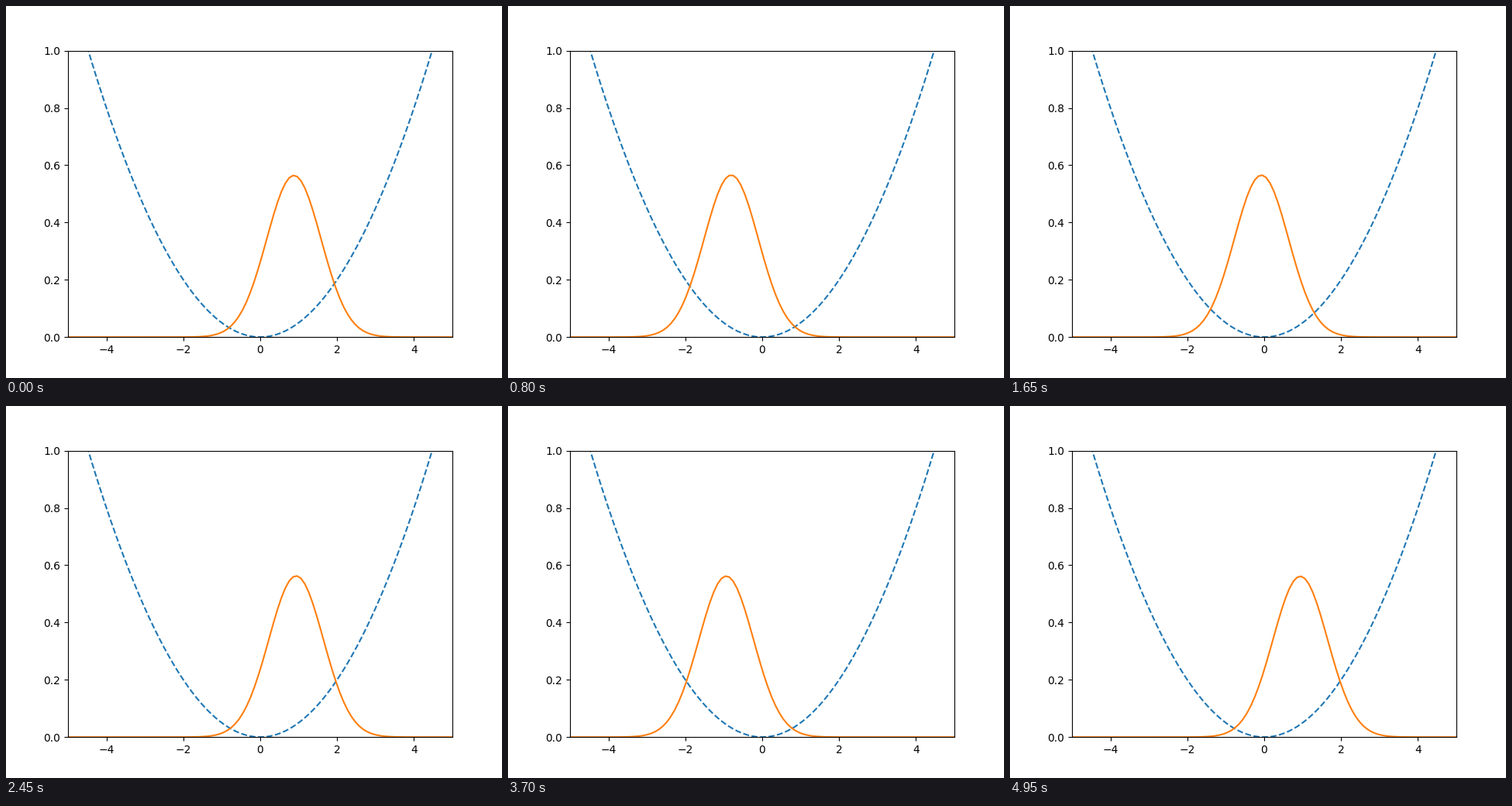
Animation, 640 px wide and 480 px high, one loop 5000 ms. Source, as a matplotlib script:

```python
import numpy as np
import matplotlib.pyplot as plt
from matplotlib.animation import FuncAnimation

FRAMES = 100
INTERVAL = 50
DT = 4 * np.pi / FRAMES
LEAD_STEPS = 4  # steps already taken when the loop begins

# Harmonic oscillator on a grid, with hbar = m = omega = 1
N = 100
x = np.linspace(-5, 5, N)
dx = x[1] - x[0]
potential = x**2 / 2
laplacian = (np.eye(N, k=1) + np.eye(N, k=-1) - 2 * np.eye(N)) / dx**2
energies, modes = np.linalg.eigh(np.diag(potential) - laplacian / 2)

# Ground state displaced by one unit, expanded in eigenmodes
packet = np.pi**-0.25 * np.exp(-((x - 1) ** 2) / 2)
coeffs = modes.T @ packet


def density(t):
    psi = modes @ (coeffs * np.exp(-1j * energies * t))
    return np.abs(psi) ** 2


fig, ax = plt.subplots(figsize=(6.4, 4.8), dpi=100)
ax.set_xlim(-5, 5)
ax.set_ylim(0, 1)
ax.plot(x, potential / 10, "--", color="C0")
(wave,) = ax.plot(x, density(LEAD_STEPS * DT), color="C1")


def update(frame):
    wave.set_ydata(density((frame + LEAD_STEPS) * DT))
    return (wave,)


anim = FuncAnimation(fig, update, frames=FRAMES, interval=INTERVAL, repeat=True, repeat_delay=0)
plt.show()
```
